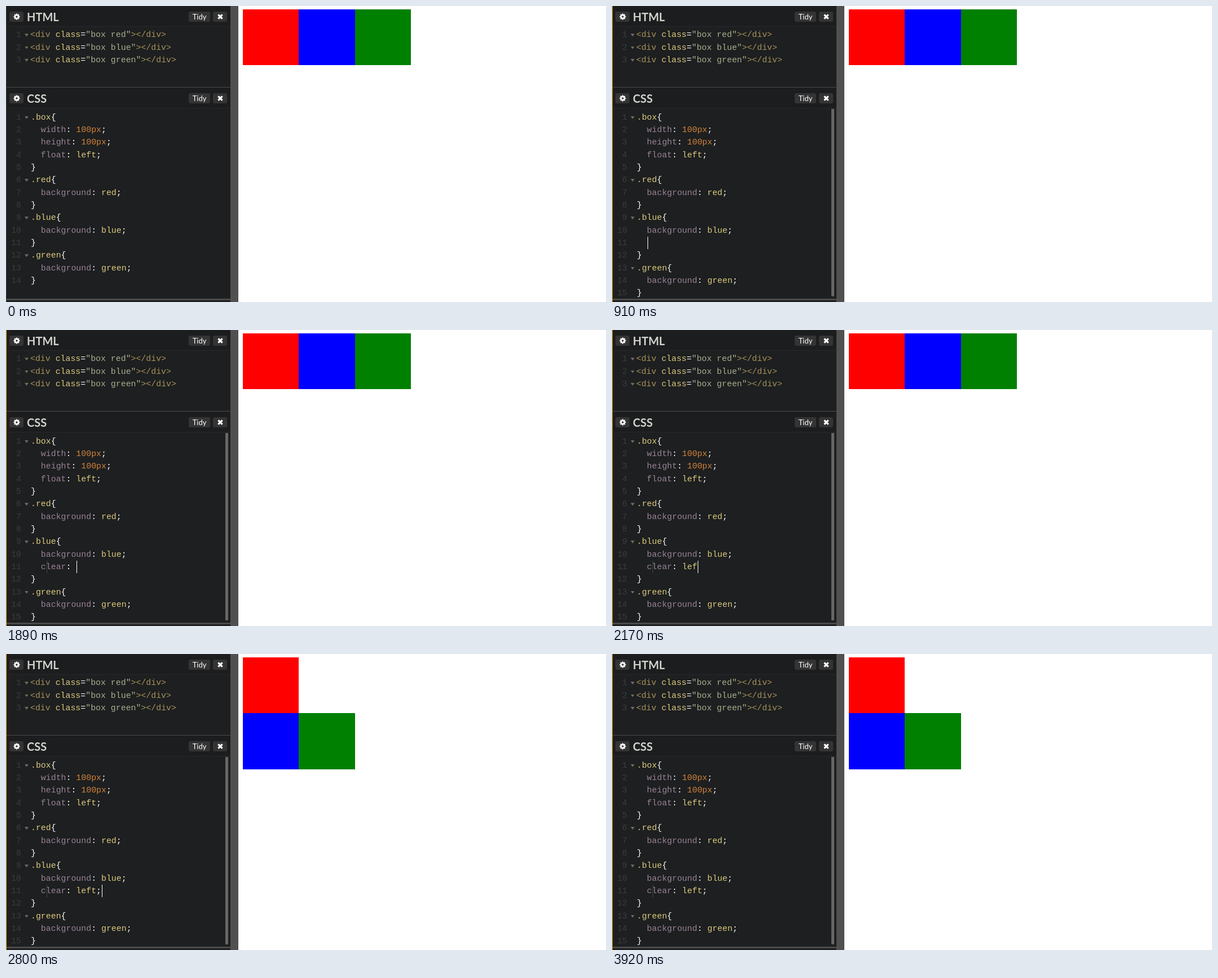
Write an HTML page that moves like this. It is 1064 by 526 pixels and loops after 4.06 s.

```html
<!DOCTYPE html>
<html lang="en">
<head>
<meta charset="utf-8">
<title>Clearing floats</title>
<style>
  html, body { margin: 0; width: 100%; height: 100%; overflow: hidden; background: #fff; }
  #stage { position: relative; width: 1064px; height: 526px; overflow: hidden; }
  #stage > *, .panel > * { position: absolute; }
  #editor { left: 0; top: 0; width: 398px; height: 526px; background: #1d1f20; }
  #edge { left: 0; top: 0; width: 1px; height: 526px; background: #3c3c3c; }
  #edge.focus { background: #fcb000; }
  .split { left: 398px; top: 0; width: 14px; height: 526px; background: #505050; }
  .bar { left: 0; width: 398px; height: 3px; background: #4a4a4a; }

  .panel { left: 0; width: 398px; overflow: hidden; }
  .head { left: 0; top: 0; width: 398px; height: 36px; background: #1c1d1e; border-bottom: 1px solid #26282a; }
  .title { left: 37px; top: 7px; font: 700 20px/24px Lato, sans-serif; color: #d2d3ce; }
  .button { top: 10px; height: 18px; border-radius: 3px; background: #343434; color: #fff;
            font: 13px/18px Lato, sans-serif; text-align: center; }
  .button svg { display: block; margin: 3px auto; }
  .gear { left: 6px; width: 25px; }
  .tidy { left: 324px; width: 38px; }
  .close { left: 367px; width: 25px; }

  ol { left: 0; margin: 0; padding: 0; width: 398px; list-style: none; counter-reset: line;
       font: 14.88px/22.32px "Liberation Mono", monospace; color: #fff; white-space: pre; }
  li { position: relative; height: 22.32px; padding-left: var(--indent); counter-increment: line; }
  li::before { content: counter(line); position: absolute; left: 0; width: 27px;
               text-align: right; color: #3a3c3e; }
  .fold::after { content: ""; position: absolute; left: 33px; top: 9px; width: 7px; height: 5px;
                 background: #6c6c68; clip-path: polygon(0 0, 100% 0, 50% 100%); }
  .tag { color: #a7925a; }
  .attr, .selector, .value { color: #ddca7e; }
  .string { color: #a9ae8e; }
  .property { color: #9a8297; }
  .number { color: #d0823a; }

  #scroll { left: 389px; top: 183px; width: 5px; height: 333px; background: #666; }
  #caret { width: 1px; background: #fff; }
  #trace { left: 72px; top: 410px; width: 1px; height: 22px; background: #3c4a48; }
  .box { width: 99.4px; height: 99.3px; }
  [hidden] { display: none; }
</style>
</head>
<body>
<div id="stage">
  <div id="editor"></div>
  <div class="panel" id="markup" style="top:0; height:144px"></div>
  <div class="bar" style="top:144px"></div>
  <div class="panel" id="styles" style="top:145.4px; height:374.6px; z-index:-1"></div>
  <div class="bar" style="top:520px"></div>
  <div class="split"></div>
  <div id="edge"></div>
  <div id="scroll"></div>
  <div id="trace"></div>
  <div id="caret"></div>
  <div class="box" style="background:red"></div>
  <div class="box" style="background:blue"></div>
  <div class="box" style="background:green"></div>
</div>
<script>
  const LOOP = 4060;
  const NEW_LINE = 910, CLEARED = 2800;
  const KEYS = [1050, 1190, 1330, 1400, 1470, 1610, 1890, 2030, 2100, 2170, 2380, 2450];
  const CARET_ON = [[70, 560], [NEW_LINE, 2940], [3430, 3920]];
  const CHAR = 8.928, BOX = 99.3;
  const TYPED = "  clear: left;";

  const get = id => document.getElementById(id);
  const span = (kind, text) => `<span class="${kind}">${text}</span>`;

  const paintCss = line => line.replace(
    /^(\.\w+)|^(\s+\w+)|(\d+px)|(\w+)/g,
    (text, selector, property, number) =>
      span(selector ? "selector" : property ? "property" : number ? "number" : "value", text));

  const paintDiv = color =>
    span("tag", "&lt;div ") + span("attr", "class") + "=" +
    span("string", `"box ${color}"`) + span("tag", "&gt;&lt;/div&gt;");

  const row = (html, fold, extra = "") => `<li class="${fold ? "fold" : ""}" ${extra}>${html}</li>`;

  function teeth() {
    return Array.from({ length: 8 }, (_, i) =>
      `<rect x="-1.2" y="-5.5" width="2.4" height="3" transform="rotate(${i * 45})"/>`).join("");
  }

  function fillPanel(panel, title, rows, top, indent) {
    panel.innerHTML = `
      <div class="head"></div>
      <div class="button gear"><svg width="12" height="12" viewBox="-6 -6 12 12" fill="#fff">
        ${teeth()}<circle r="2.9" fill="none" stroke="#fff" stroke-width="2.4"/></svg></div>
      <div class="title">${title}</div>
      <div class="button tidy">Tidy</div>
      <div class="button close"><svg width="12" height="12" viewBox="-6 -6 12 12">
        <path d="M-3.6-3.6 3.6 3.6M3.6-3.6-3.6 3.6" stroke="#fff" stroke-width="3.2"/></svg></div>
      <ol style="top:${top}px; --indent:${indent}px">${rows.join("")}</ol>`;
  }

  const rules = [".box{", "  width: 100px;", "  height: 100px;", "  float: left;", "}"];
  for (const color of ["red", "blue", "green"]) {
    rules.push(`.${color}{`, `  background: ${color};`, "}");
  }
  const cssRows = rules.map(line => row(paintCss(line), line[0] === "."));
  cssRows.splice(10, 0, row("", false, 'id="typed"'));

  fillPanel(get("markup"), "HTML", ["red", "blue", "green"].map(c => row(paintDiv(c), true)), 40.3, 43);
  fillPanel(get("styles"), "CSS", cssRows, 41.4, 44);
  get("styles").style.zIndex = "auto";

  const caret = get("caret"), typed = get("typed");
  const boxes = document.querySelectorAll(".box");
  let shown = -1;

  function draw(t) {
    const editing = t >= NEW_LINE;
    const count = KEYS.filter(time => t >= time).length;

    get("edge").className = t >= 70 ? "focus" : "";
    get("scroll").hidden = typed.hidden = !editing;
    get("trace").hidden = count < 2;
    if (count !== shown) {
      typed.innerHTML = paintCss(TYPED.slice(0, 2 + count));
      shown = count;
    }

    caret.hidden = !CARET_ON.some(([from, to]) => t >= from && t < to);
    caret.style.left = (editing ? Math.floor(45.25 + CHAR * (2 + count)) : 215) + "px";
    caret.style.top = (editing ? 410 : 387) + "px";
    caret.style.height = (editing ? 22 : 23) + "px";

    boxes.forEach((box, i) => {
      const wrapped = t >= CLEARED && i > 0;
      box.style.left = 420 + BOX * (wrapped ? i - 1 : i) + "px";
      box.style.top = 6 + (wrapped ? BOX : 0) + "px";
    });
  }

  const start = performance.now();
  function tick() {
    draw((performance.now() - start) % LOOP);
    requestAnimationFrame(tick);
  }
  tick();
</script>
</body>
</html>
```
